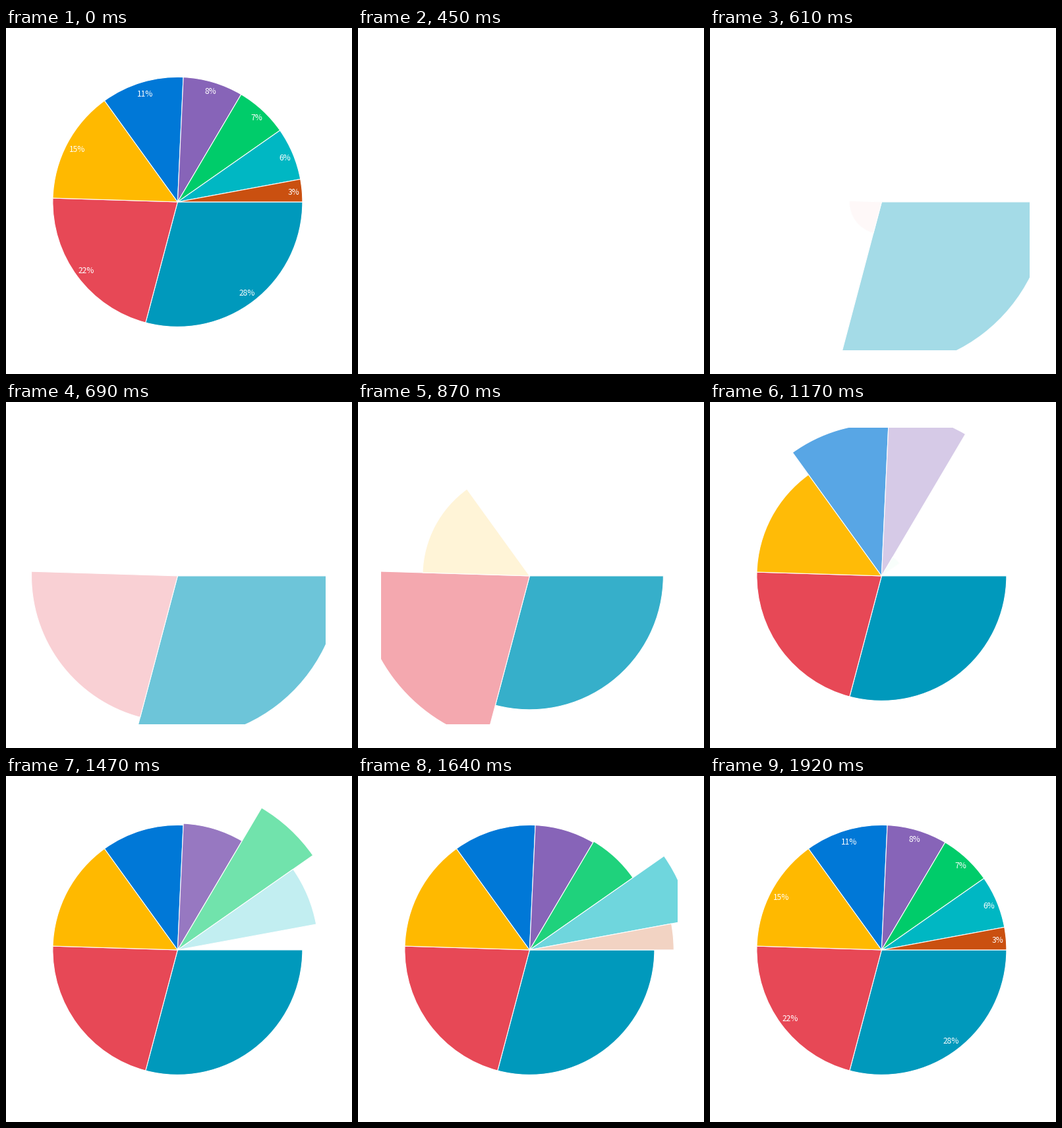
Recreate the animation shown at these times as a matplotlib script. Size 525 px wide and 525 px high, loop 2500 ms.

```python
import math

import numpy as np
import matplotlib.pyplot as plt
from matplotlib.animation import FuncAnimation
from matplotlib.colors import to_rgb
from matplotlib.patches import Rectangle, Wedge

SIZE, DPI = 525, 100
PX = 72 / DPI                     # one pixel in points
STEP, LOOP = 10, 2500             # ms
CX, CY, RADIUS = 260.4, 263.9, 189.5

START, END = 479, 1920            # build-up of the pie, ms
BLANK = 450                       # the finished pie is cleared here
GROW_MS = 369                     # time one slice takes
LAG = 0.315                       # delay between slices, in slice times
PAUSES = [(690, 100), (1265, 105), (1470, 50)]   # (time, length)
FADE_MS = 140                     # labels fade in just before END

# colour, value, label
DATA = [("#0099BC", 30, "28%"), ("#E74856", 22, "22%"),
        ("#FFB900", 15, "15%"), ("#0078D7", 11, "11%"),
        ("#8764B8", 8, "8%"), ("#00CC6A", 7, "7%"),
        ("#00B7C3", 7, "6%"), ("#CA5010", 3, "3%")]

fig = plt.figure(figsize=(SIZE / DPI, SIZE / DPI), dpi=DPI, facecolor="white")
ax = fig.add_axes([0, 0, 1, 1])
ax.set_xlim(0, SIZE)
ax.set_ylim(SIZE, 0)
ax.axis("off")

canvas = Rectangle((35, 39), 450, 450, transform=ax.transData)
total = sum(value for _, value, _ in DATA)
slices, texts = [], []
start = 0
for color, value, label in DATA:
    end = start + 360 * value / total
    wedge = Wedge((CX, CY), RADIUS, start, end, facecolor=color,
                  edgecolor="white", linewidth=1.1 * PX,
                  zorder=2 + len(slices))
    ax.add_patch(wedge)
    wedge.set_clip_path(canvas)
    slices.append(wedge)

    mid = math.radians((start + end) / 2)
    r = 184.5 - 4 * len(label)
    texts.append(ax.text(CX + r * math.cos(mid), CY + r * math.sin(mid) + 5.2,
                         label, color="white", ha="center", va="baseline",
                         fontname="Noto Sans CJK JP", fontsize=12 * PX,
                         zorder=20))
    start = end


def clock(t):
    """Running time since START, in slice times, without the pauses."""
    idle = sum(min(max(t - at, 0), length) for at, length in PAUSES)
    return max(t - START - idle, 0) / GROW_MS


def swell(p, top=0.44, over=0.37, settle=0.49):
    """Relative radius: ease out past full size, then settle back to 1."""
    if p < top:
        return (1 + over) * (1 - (1 - p / top) ** 2.2)
    q = min((p - top) / settle, 1)
    return 1 + over * (1 + math.cos(math.pi * q)) / 2


def tint(color, p):
    return 1 - p * (1 - np.array(to_rgb(color)))


def draw(frame):
    t = frame * STEP
    building = BLANK <= t < END
    for i, wedge in enumerate(slices):
        p = min(max(clock(t) - LAG * i, 0), 1) if building else 1
        wedge.set_visible(p > 0)
        wedge.set_radius(RADIUS * swell(p))
        wedge.set_facecolor(tint(DATA[i][0], p))
    fade = max(1 - (END - t) / FADE_MS, 0) if building else 1
    for text in texts:
        text.set_alpha(fade)
    return slices + texts


anim = FuncAnimation(fig, draw, frames=LOOP // STEP, interval=STEP,
                     repeat=True, repeat_delay=0, blit=False)
plt.show()
```
